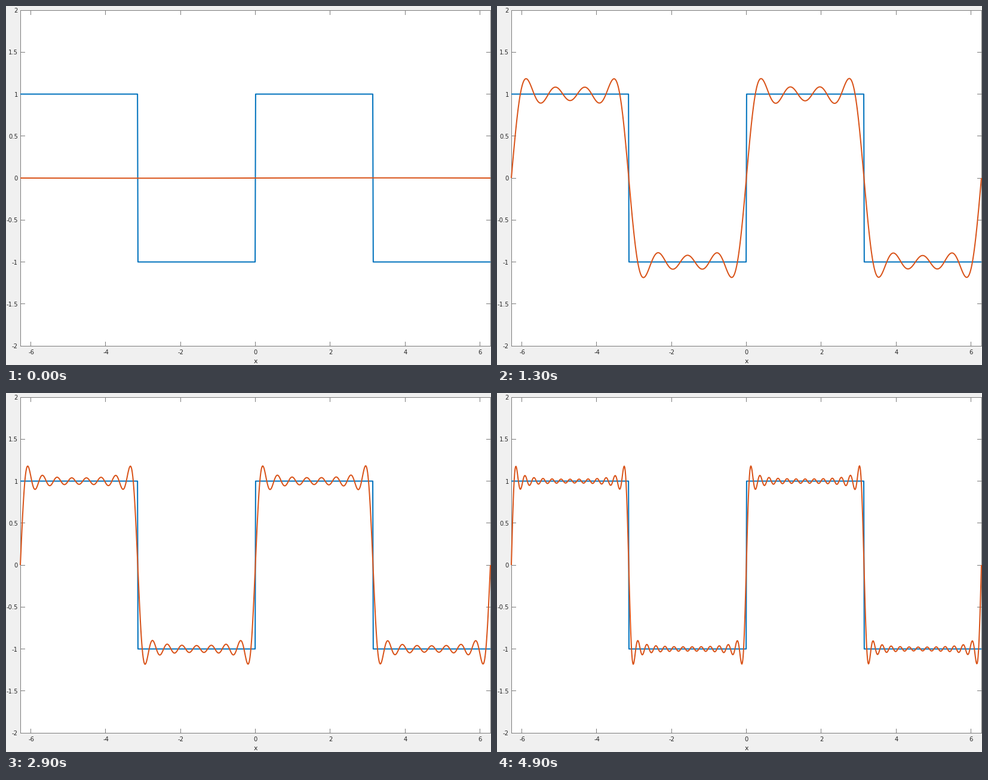
A matplotlib script for the animation above (5000 ms loop, 812 by 601 pixels).

```python
import numpy as np
import matplotlib.pyplot as plt
from matplotlib.animation import FuncAnimation
from matplotlib.patches import Rectangle

W, H, DPI = 812, 601, 64
FRAMES, INTERVAL = 50, 100
LEFT, RIGHT, TOP, BOTTOM = 24, 811, 7, 569
TICK = 8
GREY, INK = "#7c7c7c", "#262626"
BLUE, ORANGE = "#0072bd", "#d95319"

plt.rcParams["font.family"] = "DejaVu Sans"
plt.rcParams["path.simplify"] = False


def pt(px):
    return px * 72 / DPI


def to_px(x):
    return (LEFT + RIGHT) / 2 + x * (RIGHT - LEFT) / (4 * np.pi)


def to_py(y):
    return (TOP + BOTTOM) / 2 - y * (BOTTOM - TOP) / 4


fig = plt.figure(figsize=(W / DPI, H / DPI), dpi=DPI, facecolor="#f0f0f0")
ax = fig.add_axes([0, 0, 1, 1])
ax.set_xlim(0, W)
ax.set_ylim(H, 0)
ax.axis("off")


def bar(x, y, w, h, color=GREY):
    ax.add_patch(Rectangle((x, y), w, h, facecolor=color, linewidth=0, zorder=1))


def label(x, y, text, size=10, ha="center"):
    ax.text(x, y, text, fontsize=pt(size), color=INK, ha=ha, va="baseline")


def curve(y, color):
    line, = ax.plot(to_px(x), to_py(y), color=color, lw=pt(2), snap=False,
                    clip_on=False, solid_capstyle="butt",
                    solid_joinstyle="round", zorder=3)
    return line


# Plot area, box and ticks
bar(LEFT, TOP, RIGHT - LEFT + 1, BOTTOM - TOP + 1, "white")
for y in (TOP, BOTTOM):
    bar(LEFT, y, RIGHT - LEFT + 1, 1)
for x in (LEFT, RIGHT):
    bar(x, TOP, 1, BOTTOM - TOP + 1)

for v in range(-6, 7, 2):
    px = to_px(v)
    col = np.floor(px)
    bar(col, TOP, 1, TICK)
    bar(col, BOTTOM - TICK + 1, 1, TICK)
    label(px + 0.4, 583, f"{v}")

for v in np.arange(-2, 2.5, 0.5):
    py = to_py(v)
    row = np.floor(py)
    bar(LEFT, row, TICK, 1)
    bar(RIGHT - TICK + 1, row, TICK, 1)
    label(20, py + 4.1, f"{v:g}", ha="right")

label(418, 598, "x", size=11)

# Square wave and its numerical sine series over a window of 4*pi
x = np.linspace(-2 * np.pi, 2 * np.pi, 1000)
square = np.sign(np.sin(x))
dx = x[1] - x[0]
modes = np.sin(np.outer(np.arange(1, FRAMES + 1), x / 2))
coeffs = modes @ square * dx / (2 * np.pi)

curve(square, BLUE)
series = curve(coeffs[0] * modes[0], ORANGE)


def update(i):
    series.set_ydata(to_py(coeffs[:i + 1] @ modes[:i + 1]))
    return series,


anim = FuncAnimation(fig, update, frames=FRAMES, interval=INTERVAL,
                     init_func=lambda: update(0), repeat=True, repeat_delay=0)
plt.show()
```
